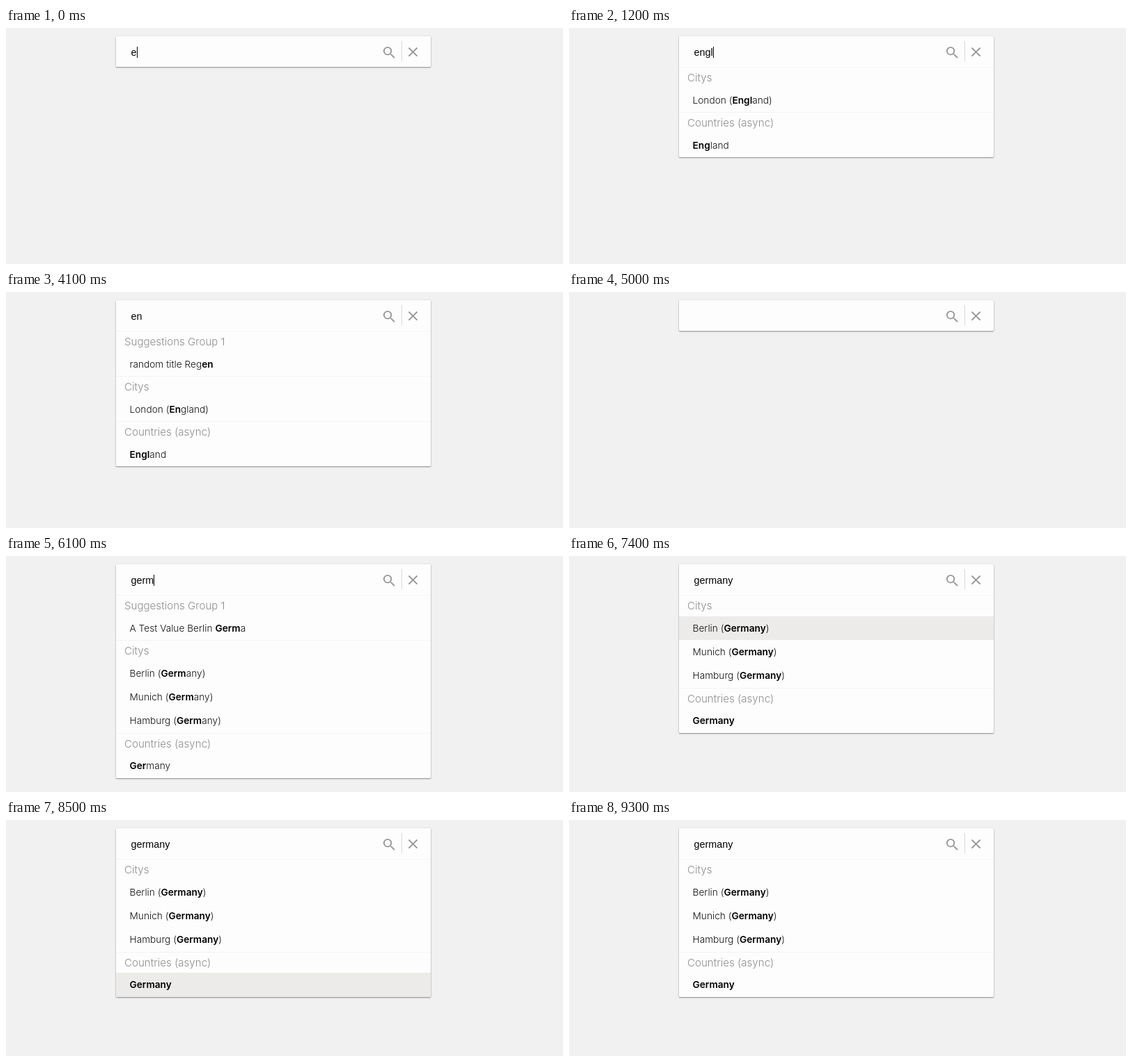
Animation, 800 px wide and 340 px high, one loop 9.4 s. Source, as an HTML page:

```html
<!DOCTYPE html>
<html lang="en">
<head>
<meta charset="utf-8">
<title>Search suggestions</title>
<style>
  html, body { margin: 0; width: 100%; height: 100%; overflow: hidden; background: #f2f1f1; }
  .card {
    position: absolute; left: 158px; top: 12px; width: 452px;
    background: #fefdfe; border-radius: 1px;
    box-shadow: 0 1px 2px rgba(0, 0, 0, .42), 0 0 2px rgba(0, 0, 0, .1);
  }
  .field { position: relative; height: 44px; }
  .input {
    position: absolute; left: 21.5px; top: 12px; height: 22px;
    font: 14.4px/22px "Liberation Sans", Arial, sans-serif;
    color: #000; white-space: pre;
  }
  .caret {
    display: inline-block; width: 1px; height: 16px; margin-right: -1px;
    vertical-align: -3px; background: #000;
  }
  .icon { position: absolute; width: 23px; height: 23px; fill: #9a9999; }
  .search { left: 381px; top: 12px; }
  .close { left: 414.5px; top: 11px; }
  .rule { position: absolute; left: 410px; top: 7px; width: 1px; height: 29px; background: #d9d8d9; }
  .list { font-family: Inter, "Open Sans", sans-serif; font-weight: 300; white-space: pre; }
  .head {
    box-sizing: border-box; height: 30.6px; padding-left: 12px;
    border-top: 1px solid #f3f2f6;
    font-size: 15.1px; line-height: 30px; color: #8e8e8e;
  }
  .row { height: 34.4px; padding-left: 19.5px; font-size: 13.7px; line-height: 34px; color: #111; }
  .row b { font-weight: 600; color: #000; }
  .row.on { background: #ecebe9; }
</style>
</head>
<body>
<div class="card">
  <div class="field">
    <div class="input"><span id="text"></span><span id="caret" class="caret"></span></div>
    <svg class="icon search" viewBox="0 0 24 24"><path d="M15.5 14h-.79l-.28-.27A6.47 6.47 0 0 0 16 9.5 6.5 6.5 0 1 0 9.5 16c1.61 0 3.09-.59 4.23-1.57l.27.28v.79l5 4.99L20.49 19l-4.99-5zm-6 0a4.5 4.5 0 1 1 0-9 4.5 4.5 0 0 1 0 9z"/></svg>
    <div class="rule"></div>
    <svg class="icon close" viewBox="0 0 24 24"><path d="M19 6.41 17.59 5 12 10.59 6.41 5 5 6.41 10.59 12 5 17.59 6.41 19 12 13.41 17.59 19 19 17.59 13.41 12z"/></svg>
  </div>
  <div id="list" class="list"></div>
</div>
<script>
const LOOP = 9400, BLINK = 500, MIN_LENGTH = 2;

const suggestions = ['random title Regen', 'A Test Value Berlin Germa'];
const cities = ['London (England)', 'Berlin (Germany)', 'Munich (Germany)', 'Hamburg (Germany)'];
const countries = ['England', 'Greenland', 'Germany'];

// Each track holds [start ms, value] steps.
const typed = [
  [0, 'e'], [100, 'en'], [600, 'eng'], [1100, 'engl'], [1600, 'engla'], [1900, 'englan'], [2100, 'england'],
  [3400, 'englan'], [3450, 'engla'], [3500, 'engl'], [3550, 'eng'], [3600, 'en'], [4400, 'e'], [4500, ''],
  [5200, 'g'], [5400, 'ge'], [5700, 'ger'], [6000, 'germ'], [6300, 'germa'], [6600, 'german'], [6800, 'germany']
];
// The query whose country results have arrived so far.
const answered = [
  [0, ''], [700, 'en'], [1000, 'eng'], [1400, 'engl'], [1800, 'engla'], [2200, 'englan'], [2500, 'england'],
  [3700, 'englan'], [3900, 'engl'], [4400, ''],
  [5800, 'ge'], [6000, 'ger'], [6400, 'germ'], [6700, 'germa'], [7000, 'german'], [7300, 'germany']
];
const selected = [[0, -1], [7300, 0], [7700, 1], [8100, 2], [8500, 3], [8900, -1]];

const $ = id => document.getElementById(id);
const stepAt = (track, t) => track.findLast(([start]) => start <= t);

function make(className, ...content) {
  const el = document.createElement('div');
  el.className = className;
  el.append(...content);
  return el;
}

function marked(label, query) {
  const at = label.toLowerCase().indexOf(query), end = at + query.length;
  const bold = document.createElement('b');
  bold.textContent = label.slice(at, end);
  return [label.slice(0, at), bold, label.slice(end)];
}

function buildList(query, remote, pick) {
  const nodes = [];
  let index = 0;
  const group = (title, labels, term) => {
    const hits = term ? labels.filter(s => s.toLowerCase().includes(term)) : [];
    if (!hits.length) return;
    nodes.push(make('head', title));
    for (const hit of hits) {
      nodes.push(make(index++ === pick ? 'row on' : 'row', ...marked(hit, term)));
    }
  };
  if (query.length >= MIN_LENGTH) {
    group('Suggestions Group 1', suggestions, query);
    group('Citys', cities, query);
    group('Countries (async)', countries, remote);
  }
  $('list').replaceChildren(...nodes);
}

let shown = null;

function draw(now) {
  const t = now % LOOP;
  const [keyTime, query] = stepAt(typed, t);
  const remote = stepAt(answered, t)[1];
  const pick = stepAt(selected, t)[1];
  $('caret').style.visibility = (t - keyTime) % (2 * BLINK) < BLINK ? 'visible' : 'hidden';
  const state = [query, remote, pick].join('|');
  if (state !== shown) {
    shown = state;
    $('text').textContent = query;
    buildList(query, remote, pick);
  }
}

const origin = performance.now();
function tick() {
  draw(performance.now() - origin);
  requestAnimationFrame(tick);
}
tick();
</script>
</body>
</html>
```
